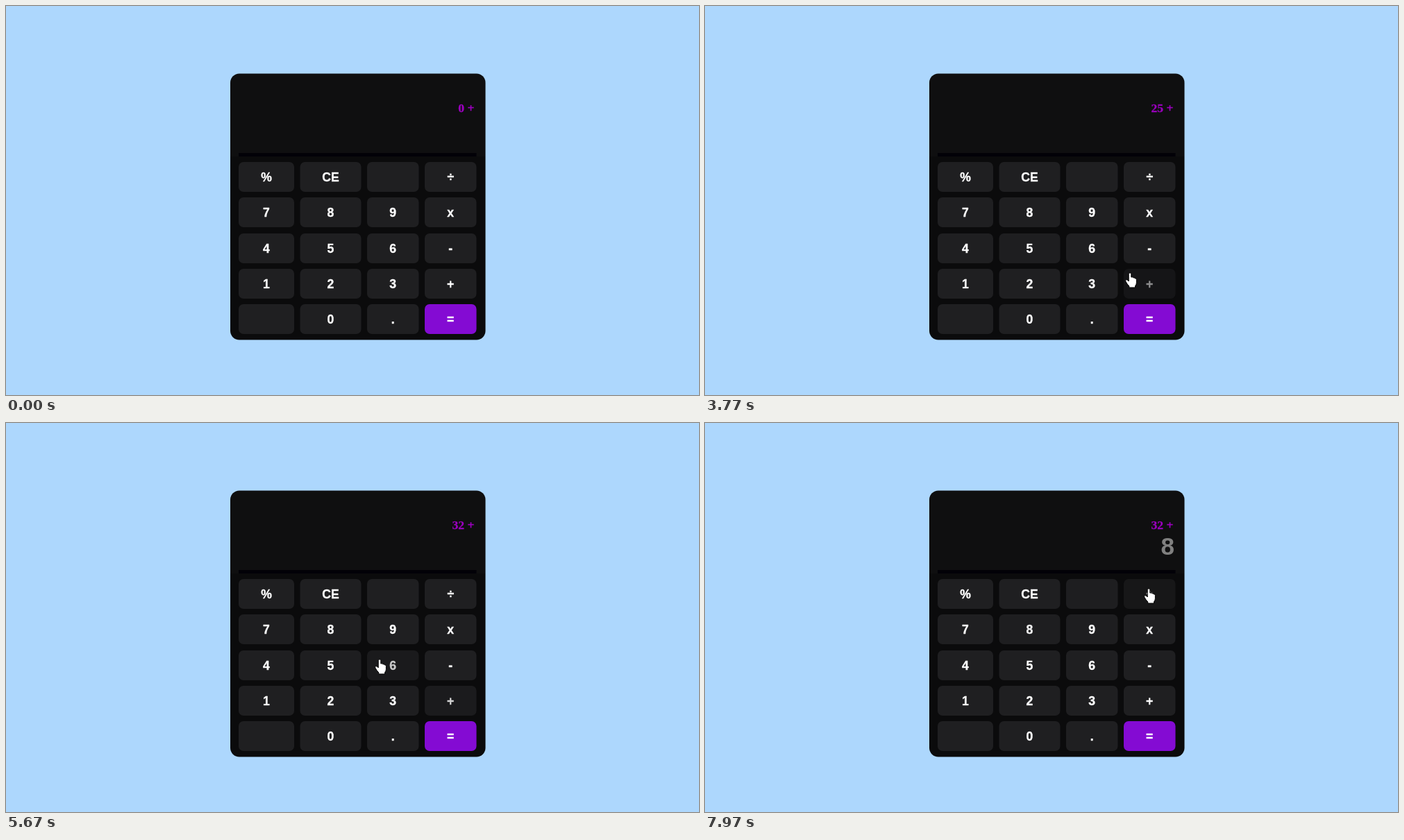
Animation of 998 by 561 pixels, one loop 8 s. Source, as an HTML page:

```html
<!DOCTYPE html>
<html lang="en">
<head>
<meta charset="utf-8">
<title>Calculator</title>
<style>
  html, body { margin: 0; width: 100%; height: 100%; overflow: hidden; background: #add7fd; }
  svg { display: block; width: 998px; height: 561px; }
  .key text {
    font: bold 17.6px "Liberation Sans", Arial, sans-serif;
    fill: #fff; stroke: #fff; stroke-width: .35px; text-anchor: middle;
  }
  .display { text-anchor: end; }
  #sum {
    font: bold 17.6px "Liberation Serif", "Times New Roman", serif;
    fill: #9b00be; stroke: #9b00be; stroke-width: .3px;
  }
  #entry { font: bold 35px "Liberation Sans", Arial, sans-serif; fill: #808080; }
</style>
</head>
<body>
<svg viewBox="0 0 998 561">
  <linearGradient id="body" x2="0" y2="1">
    <stop offset=".31" stop-color="#0f0f10"/>
    <stop offset=".31" stop-color="#0b0b0c"/>
  </linearGradient>
  <rect x="323" y="97.5" width="367.5" height="384" rx="13" fill="url(#body)"/>
  <rect x="335" y="212" width="342.5" height="5" fill="#020107"/>
  <text id="sum" class="display" x="674.5" y="153"></text>
  <text id="entry" class="display" x="676" y="190"></text>
  <g id="keys"></g>
  <g id="pointer" stroke="#000" stroke-linejoin="round" fill="#fff">
    <path id="arrow" d="M0 0V16.5L3.8 12.9L6.4 18.6L9 17.4L6.5 11.9H11.6Z"/>
    <path id="hand" d="M-1.8 1.6Q-1.6 -.2 0 -.2Q1.7 -.2 1.8 1.6V6.1Q3.7 5.4 4.6 6.8Q6.3 6.3 7.1 7.7Q9.3 7.5 9.4 9.6V14.2Q9.2 17 7.6 18.6V21H-1.2V19Q-4.2 16 -6.2 12.1Q-6.9 10.2 -5.2 9.7Q-3.7 9.5 -1.8 12Z"/>
  </g>
</svg>
<script>
const LOOP = 8000, STEP = 10, FADE = 220, GAP = 8.5, SAG = 0.07;
const widths = [80, 88, 74.5, 74.5];
const rows = ["% CE _ ÷", "7 8 9 x", "4 5 6 -", "1 2 3 +", "_ 0 . ="];

const $ = id => document.getElementById(id);

function svg(tag, attributes, parent) {
  const node = document.createElementNS("http://www.w3.org/2000/svg", tag);
  for (const name in attributes) node.setAttribute(name, attributes[name]);
  return parent.appendChild(node);
}

function makeKey(label, x, y, width) {
  const height = 43, node = svg("g", { class: "key" }, $("keys"));
  svg("rect", { x, y, width, height, rx: 7, fill: label === "=" ? "#840bd3" : "#1f1f21" }, node);
  if (label !== "_") svg("text", { x: x + width / 2, y: y + 28 }, node).textContent = label;
  return { label, node, x, y, width, height, fades: [] };
}

const keys = rows.flatMap((row, r) => {
  let x = 335;
  return row.split(" ").map((label, c) => {
    const key = makeKey(label, x, Math.round(225 + r * 51.3), widths[c]);
    x += widths[c] + GAP;
    return key;
  });
});

// A visit rests on a key, slightly off its centre, and may press it.
function visit(label, dx, dy, arrive, leave, press) {
  const key = keys.find(k => k.label === label);
  return {
    label, arrive, leave, press,
    x: key.x + key.width / 2 + dx, y: key.y + key.height / 2 + dy
  };
}

const visits = [
  { x: -20, y: 420, arrive: 0, leave: 300 },
  visit("2", -9, 8, 1200, 1640, 1430),
  visit("5", -2, 0, 1900, 2550, 2250),
  visit("+", -28, -16, 3250, 3800, 3480),
  visit("7", 20, 2, 4430, 4600, 4520),
  visit("+", -28, -16, 5035, 5388, 5320),
  visit("8", 17, -3, 5898, 7350, 7080),
  visit("÷", -1, -8, 7750, LOOP)
];

function pointerAt(time) {
  const i = visits.findLastIndex(v => v.arrive <= time);
  const from = visits[i], to = visits[i + 1];
  if (time <= from.leave) return [from.x, from.y];
  const t = (time - from.leave) / (to.arrive - from.leave);
  const u = t * t * (3 - 2 * t), dx = to.x - from.x;
  return [
    from.x + dx * u,
    from.y + (to.y - from.y) * u + SAG * Math.abs(dx) * 4 * u * (1 - u)
  ];
}

function readingAt(time) {
  let total = 0, entry = "";
  for (const { label, press } of visits) {
    if (!(press <= time)) continue;
    if (label === "+") {
      total += Number(entry);
      entry = "";
    } else entry += label;
  }
  return [total + " +", entry];
}

const covers = (key, [x, y]) =>
  x >= key.x && x <= key.x + key.width && y >= key.y && y <= key.y + key.height;

// Hover fades depend on earlier positions, so work them out once for the whole loop.
const rate = 1 - Math.exp(-STEP / FADE);
for (let time = 0; time <= LOOP; time += STEP) {
  const point = pointerAt(time);
  for (const key of keys) {
    const last = key.fades.at(-1) || 0;
    key.fades.push(last + (covers(key, point) - last) * rate);
  }
}

function draw(time) {
  const point = pointerAt(time);
  [$("sum").textContent, $("entry").textContent] = readingAt(time);
  for (const key of keys)
    key.node.setAttribute("opacity", 1 - 0.5 * key.fades[Math.floor(time / STEP)]);
  const overKey = keys.some(key => covers(key, point));
  $("hand").style.display = overKey ? "" : "none";
  $("arrow").style.display = overKey ? "none" : "";
  $("pointer").setAttribute("transform", `translate(${point.map(Math.round)})`);
}

const start = performance.now();
function tick(now) {
  draw(Math.max(0, now - start) % LOOP);
  requestAnimationFrame(tick);
}
draw(0);
requestAnimationFrame(tick);
</script>
</body>
</html>
```
